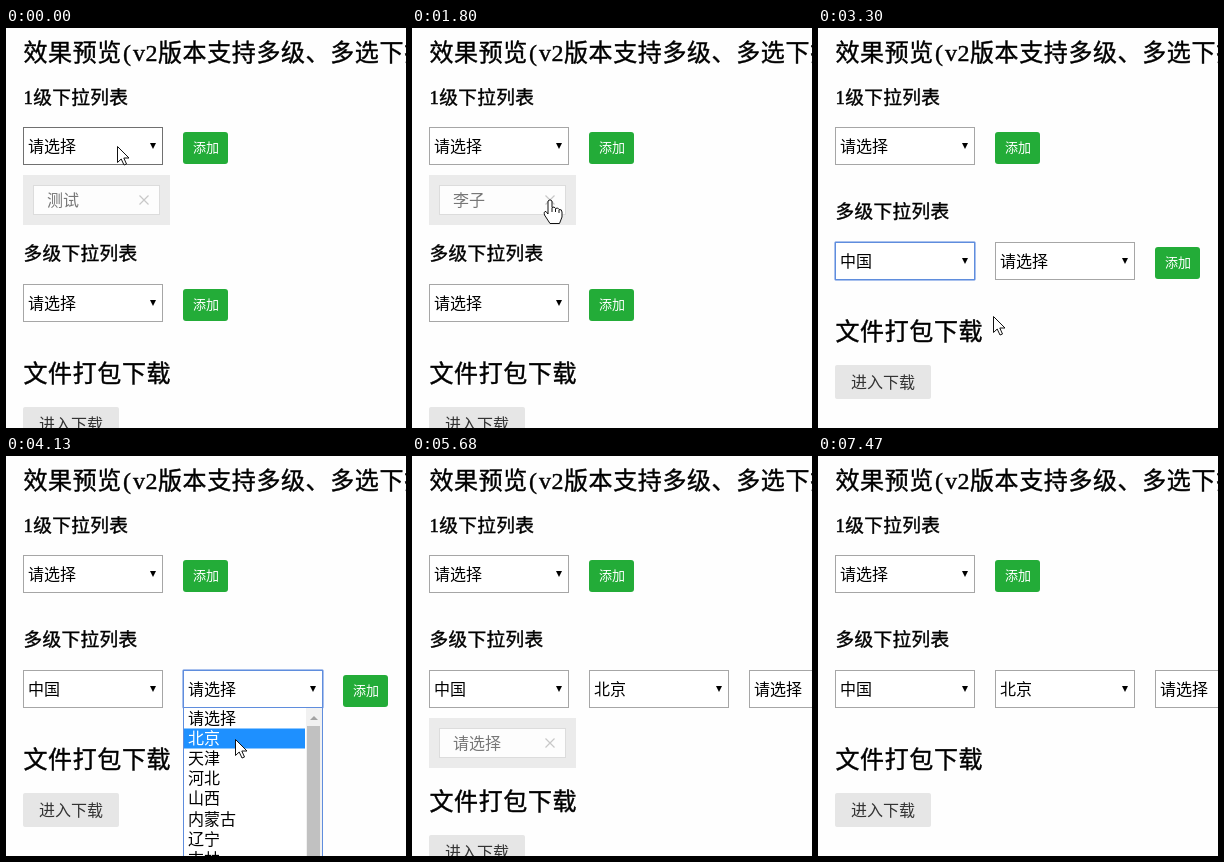
These frames come from a looping animation (400 px wide and 400 px high, 7780 ms). An HTML page:

```html
<!DOCTYPE html>
<html lang="zh-CN">
<head>
<meta charset="utf-8">
<style>
  html, body { margin: 0; width: 100%; height: 100%; overflow: hidden; background: #fefefe; }
  svg { display: block; width: 100%; height: 100%; }
  text { font: 16px "Noto Sans CJK SC", "Noto Sans CJK", sans-serif; }
  .h2, .h3 {
    font: 500 24px "Liberation Serif", "Noto Sans CJK SC", "Noto Sans CJK", serif;
    letter-spacing: .6px; stroke: #000; stroke-width: .4px;
  }
  .h3 { font-size: 18.72px; letter-spacing: .3px; }
  .small { font-size: 13px; }
  .light { font-weight: 300; }
</style>
</head>
<body>
<svg id="stage" viewBox="0 0 400 400"></svg>
<script>
const LOOP = 7780;
const REFRESH = 140; // the pointer is redrawn at this interval
const ASK = '请选择';

// Places where the pointer comes to rest: arrival time, x, y
const stops = [
  [0, 111, 118], [420, 88, 183], [830, 214, 125], [1110, 230, 155], [1530, 138, 172],
  [2510, 125, 237], [2980, 112, 281], [3210, 175, 288], [3690, 228, 241], [4050, 229, 283],
  [4960, 410, 236], [5200, 410, 410], [6230, 270, 410], [6650, 138, 287], [7230, 272, 333],
  [7420, 400, 410]
];

// The pointer waits at a stop, then leaves in time for the next; longer ways take longer.
function pointerAt(t) {
  const next = stops.findIndex(s => s[0] > t);
  if (next < 0) return stops.at(-1).slice(1);
  const [t0, x0, y0] = stops[next - 1];
  const [t1, x1, y1] = stops[next];
  const travel = Math.min(t1 - t0, 150 + 1.5 * Math.hypot(x1 - x0, y1 - y0));
  const u = Math.max(0, 1 - (t1 - t) / travel);
  const eased = u * u * (3 - 2 * u);
  return [Math.round(x0 + (x1 - x0) * eased), Math.round(y0 + (y1 - y0) * eased)];
}

const inside = ([px, py], x, y, w, h) => px >= x && px < x + w && py >= y && py < y + h;
const rect = (x, y, w, h, fill, more = '') =>
  `<rect x="${x}" y="${y}" width="${w}" height="${h}" fill="${fill}" ${more}/>`;
const text = (x, y, s, fill = '#000', cls = '') =>
  `<text x="${x}" y="${y}" fill="${fill}" class="${cls}">${s}</text>`;
const triangle = (x, y, w, h, fill) =>
  `<path d="M${x} ${y}h${w}l${-w / 2} ${h}z" fill="${fill}"/>`;

function select(x, y, label, focused, at) {
  const ring = focused ? rect(x - .5, y - .5, 141, 39, 'none', 'rx="1.5" stroke="#a9c1ee"') : '';
  const edge = focused ? '#5f8ddd' : inside(at, x, y, 140, 38) ? '#707070' : '#a6a6a6';
  return ring + rect(x + .5, y + .5, 139, 37, '#fff', `stroke="${edge}"`) +
    text(x + 5, y + 25, label) + triangle(x + 127, y + 16, 6, 6, '#000');
}

function addButton(x, y, at) {
  return rect(x, y, 45, 32, inside(at, x, y, 45, 32) ? '#4dbb5e' : '#23ac38', 'rx="3"') +
    text(x + 10, y + 19.5, '添加', '#fff', 'small');
}

function tagBar(y, tags) {
  if (!tags.length) return '';
  return rect(17, y, 147 * tags.length, 50, '#ebebeb') + tags.map((tag, i) => {
    const x = 27 + 147 * i;
    return rect(x + .5, y + 10.5, 126, 29, '#fdfdfd', 'stroke="#dcdcdc"') +
      text(x + 14, y + 31, tag, '#777') +
      `<path d="M${x + 106.5} ${y + 20.5}l9 9m0-9l-9 9" stroke="#c8c8c8" stroke-width="1.2"/>`;
  }).join('');
}

function dropdown(x, y, items, at, scrolls) {
  const active = Math.max(0, Math.floor((at[1] - y) / 20));
  const height = 20 * items.length;
  const rows = items.map((item, i) => {
    const on = i === active;
    return (on ? rect(x + 1, y + 20 * i + .5, scrolls ? 121 : 138, 20, '#1e90ff') : '') +
      text(x + 5, y + 20.1 * i + 16, item, on ? '#fff' : '#000');
  }).join('');
  const bar = scrolls
    ? rect(x + 123, y, 16, height, '#f1f1f1') + rect(x + 124, y + 18, 13, height, '#c1c1c1') +
      triangle(x + 127, y + 12, 8, -4, '#a3a3a3')
    : '';
  return rect(x + .5, y - .5, 139, height, '#fff', 'stroke="#5f8ddd"') + rows + bar;
}

function pointer([x, y], hand) {
  const d = hand
    ? 'M-2 1Q0-1.500 2 1V7.500Q4.500 6 5.500 8.500Q8 7 9 9.500Q12 9 12 12V17L9.500 23.500H0L-5.500 15Q-6.500 11-4 11.500L-2 14ZM2 8V12M5.500 9V12M9 10V13'
    : 'M.5.5V16.500L4.200 13L7 19L9.500 18L6.800 12H12Z';
  return `<path transform="translate(${x} ${y})" d="${d}" fill="#fff" stroke="#111" stroke-linejoin="round"/>`;
}

function scene(t) {
  const within = (from, to) => t >= from && t < to;
  const at = pointerAt(Math.floor(t / REFRESH) * REFRESH);

  const tags1 = t < 970 ? ['测试'] : t < 1800 ? ['测试', '李子'] : t < 2080 ? ['李子'] : [];
  const tags2 = within(5480, 6800) ? [ASK] : [];
  const levels = t < 3170 ? [ASK] : t < 4280 ? ['中国', ASK] : ['中国', '北京', ASK];
  const focus = within(2600, 3580) ? 0 : within(3580, 5280) ? 1 : -1;

  const y1 = 99;
  const y2 = tags1.length ? 256 : 214;
  const y3 = y2 + 123 + (tags2.length ? 42 : 0);

  let out = text(17.5, 33, '效果预览', '#000', 'h2') + text(117, 33, '(', '#000', 'h2') +
    text(127, 33, 'v2', '#000', 'h2') + text(152, 33, '版本支持多级、多选下拉', '#000', 'h2') +
    text(17.5, 75.5, '1级下拉列表', '#000', 'h3') +
    select(17, y1, within(560, 970) ? '李子' : ASK, within(150, 970), at) +
    addButton(177, y1 + 5, at) +
    tagBar(y1 + 48, tags1);

  out += text(17.5, y2 - 24, '多级下拉列表', '#000', 'h3') +
    levels.map((label, i) => select(17 + 160 * i, y2, label, i === focus, at)).join('') +
    addButton(17 + 160 * levels.length, y2 + 5, at) +
    tagBar(y2 + 48, tags2);

  out += text(17.5, y3 - 25, '文件打包下载', '#000', 'h2') +
    rect(17, y3, 96, 34, '#e6e6e6', 'rx="2"') + text(33, y3 + 23, '进入下载', '#333', 'light');

  if (within(150, 560)) out += dropdown(17, y1 + 38, [ASK, '桃子', '李子'], at);
  if (within(2720, 3170)) out += dropdown(17, y2 + 38, [ASK, '中国', '美国'], at);
  if (within(3720, 4280)) {
    const provinces = [ASK, '北京', '天津', '河北', '山西', '内蒙古', '辽宁', '吉林'];
    out += dropdown(177, y2 + 38, provinces, at, true);
  }

  const overClose = (y, tags) => tags.length > 0 && inside(at, 130, y + 65, 16, 16);
  const hand = inside(at, 177, y1 + 5, 45, 32) || overClose(y1, tags1) || overClose(y2, tags2);
  return out + pointer(at, hand);
}

const stage = document.getElementById('stage');
const start = performance.now();
let shown = '';

function draw() {
  const markup = scene((performance.now() - start) % LOOP);
  if (markup !== shown) stage.innerHTML = shown = markup;
  requestAnimationFrame(draw);
}
draw();
</script>
</body>
</html>
```
